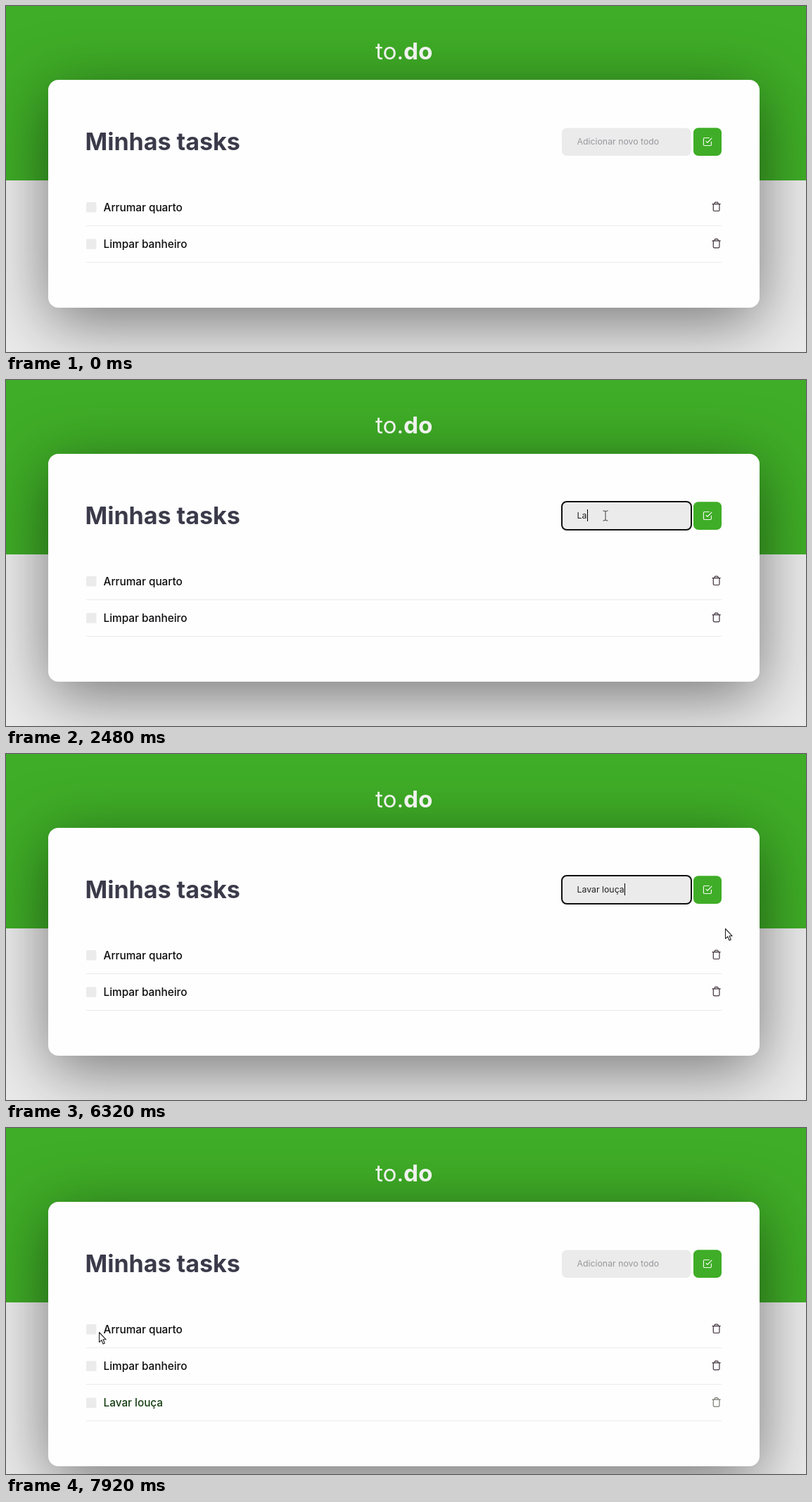
Animation, 1137 px wide and 492 px high, one loop 7990 ms. Source, as an HTML page:

```html
<!DOCTYPE html>
<html lang="pt-BR">
<head>
<meta charset="utf-8">
<title>to.do</title>
<style>
html, body { margin: 0; width: 100%; height: 100%; overflow: hidden; background: #ebebeb; }
svg { position: absolute; left: 0; top: 0; font-family: Inter, "Open Sans", sans-serif; }
#header { position: absolute; inset: 0 0 auto; height: 248.4px; background: #3fad27; }
#card {
  position: absolute; left: 59.5px; top: 104.5px; width: 1011.5px;
  border-radius: 14.5px; background: #fefefe; box-shadow: 0 20px 90px rgba(0, 0, 0, .5);
}
text { white-space: pre; }
.logo { font-size: 33.2px; font-weight: 400; fill: #f0f2ef; }
.logo tspan { font-weight: 700; }
.title { font-size: 34px; font-weight: 700; fill: #3a3a4a; }
.item { font-size: 15.3px; font-weight: 500; fill: #0c0c0e; }
.item.new { fill: #143d12; }
.field { font-size: 12.3px; fill: #222; }
.field.hint { fill: #98989d; }
.icon { fill: none; stroke-width: 1.9; stroke-linecap: round; stroke-linejoin: round; }
.pointer { fill: #fff; stroke: #222; stroke-width: 1.1; stroke-linejoin: round; }
</style>
</head>
<body>
<div id="header"></div>
<div id="card"></div>
<svg width="1137" height="492" viewBox="0 0 1137 492">
  <text class="logo" x="525" y="75.5">to.<tspan>do</tspan></text>
  <text class="title" x="112.5" y="205">Minhas tasks</text>

  <rect x="790" y="173.5" width="183.5" height="39.5" rx="7" fill="#ebebeb"/>
  <rect id="focus" x="790" y="173" width="184" height="40" rx="7" fill="none" stroke="#101010" stroke-width="2"/>
  <text id="field" class="field" x="811.5" y="197"></text>
  <path id="caret" d="M0 184V201" stroke="#000"/>

  <rect id="button" x="977" y="173.3" width="40" height="39.7" rx="7"/>
  <path class="icon" transform="translate(997.2 193) scale(.61) translate(-12.5 -12)" stroke="#f2f8f0"
    d="M9 11l3 3L22 4M21 12v7a2 2 0 0 1-2 2H5a2 2 0 0 1-2-2V5a2 2 0 0 1 2-2h11"/>

  <g id="items"></g>

  <circle id="click" r="11"/>
  <g id="cursor">
    <path id="arrow" class="pointer" d="M.5.5V14.6L3.7 11.7 6 17 8.3 16 6 10.8H10.2Z"/>
    <path id="beam" fill="none" stroke="#3a3a3a"
      d="M-3.5-7Q-.5-7 0-6Q.5-7 3.5-7M0-6V6M-3.5 7Q-.5 7 0 6Q.5 7 3.5 7"/>
    <path id="hand" class="pointer" d="M-1 1.7A1.7 1.7 0 0 1 2.4 1.7V7.2A1.5 1.5 0 0 1 5.4 7.5A1.5 1.5 0 0 1 8.3 8.2A1.5 1.5 0 0 1 11 9.5V13.5Q11 16 9.3 18V20.5H1V18.5Q-1 16-5 12.6A1.6 1.6 0 0 1-2.8 10.4L-1 12Z"/>
  </g>
</svg>
<script>
const LOOP = 7990;
const FOCUS = [1350, 6650];
const ADDED = 6780;
const HINT = 'Adicionar novo todo';
const TASK = 'Lavar louça';
const KEY_TIMES = [2080, 2480, 2880, 3020, 3100, 3300, 4100, 4370, 4640, 5180, 5240];
const BLINK = 530;

// Each move: first step, last step, number of steps, cubic Bezier points.
const MOVES = [
  [190, 950, 12, [[1052, 488], [1010, 400], [890, 225], [855, 195]]],
  [1080, 1080, 1, [[855, 195], [854, 194], [853, 193], [852, 193]]],
  [5900, 6520, 10, [[852, 193], [960, 260], [1072, 320], [998, 186]]],
  [7240, 7920, 11, [[998, 186], [800, 250], [420, 265], [132, 290]]]
];

const YELLOW = 'rgba(247, 238, 20, .6)';
const CLICKS = [
  [1080, 1350, 850, 192, YELLOW],
  [6590, 6780, 998, 186, YELLOW],
  [6780, 7240, 998, 186, 'rgba(48, 134, 30, .7)']
];

const $ = id => document.getElementById(id);
const show = (id, on) => { $(id).style.display = on ? '' : 'none'; };
const within = (t, [from, to]) => t >= from && t < to;
const inBox = ([x, y], left, right) => x >= left && x <= right && y >= 173 && y <= 213;

function itemMarkup(label, i) {
  const y = 286 + i * 52.3;
  const isNew = i === 2;
  return `<g id="item${i}">
    <rect x="114" y="${y - 7}" width="14.4" height="14.4" rx="1.5" fill="#ebebeb"/>
    <text class="item${isNew ? ' new' : ''}" x="138.6" y="${y + 5.7}">${label}</text>
    <path class="icon" transform="translate(1009.6 ${y - .7}) scale(.62) translate(-12 -12)" stroke="${isNew ? '#74776c' : '#3a2c36'}"
      d="M3 6H21M19 6V20a2 2 0 0 1-2 2H7a2 2 0 0 1-2-2V6M8 6V4a2 2 0 0 1 2-2h4a2 2 0 0 1 2 2V6"/>
    <path d="M114 ${Math.floor(y + 26) + .5}H1017" stroke="#ebebeb"/>
  </g>`;
}
$('items').innerHTML = ['Arrumar quarto', 'Limpar banheiro', TASK].map(itemMarkup).join('');

function bezier([a, b, c, d], p) {
  const q = 1 - p;
  return [0, 1].map(k =>
    q * q * q * a[k] + 3 * q * q * p * b[k] + 3 * q * p * p * c[k] + p * p * p * d[k]);
}

function cursorAt(t) {
  const move = MOVES.filter(m => t >= m[0]).pop();
  if (!move) return null;
  const [from, to, count, points] = move;
  const step = count > 1 ? Math.floor((t - from) / (to - from) * (count - 1) + 1e-6) : 0;
  const p = Math.min(1, (step + 1) / count);
  return bezier(points, p * p * (3 - 2 * p));
}

function drawField(t) {
  const focused = within(t, FOCUS);
  const typed = t < ADDED ? TASK.slice(0, KEY_TIMES.filter(k => t >= k).length) : '';
  const field = $('field');
  field.textContent = typed || HINT;
  field.classList.toggle('hint', !typed);
  const lastInput = [FOCUS[0], ...KEY_TIMES].filter(k => t >= k).pop();
  show('focus', focused);
  show('caret', focused && Math.floor((t - lastInput) / BLINK) % 2 === 0);
  const width = typed ? field.getComputedTextLength() : 0;
  $('caret').setAttribute('transform', `translate(${Math.round(812 + width) + .5} 0)`);
}

function drawCursor(t) {
  const pos = cursorAt(t);
  show('cursor', pos);
  const overField = pos && inBox(pos, 790, 973);
  const overButton = pos && inBox(pos, 977, 1017);
  show('beam', overField);
  show('hand', overButton);
  show('arrow', !overField && !overButton);
  $('button').setAttribute('fill', overButton ? '#3a9f24' : '#3fad27');
  if (pos) $('cursor').setAttribute('transform', `translate(${pos.map(Math.round)})`);

  const click = CLICKS.find(c => within(t, c));
  show('click', click);
  if (click) {
    const [, , x, y, color] = click;
    $('click').setAttribute('transform', `translate(${x} ${y})`);
    $('click').setAttribute('fill', color);
  }
}

function draw(now) {
  const t = now % LOOP;
  drawField(t);
  drawCursor(t);
  show('item2', t >= ADDED);
  $('card').style.height = (t >= ADDED ? 376.7 : 324.4) + 'px';
}

const start = performance.now();
function tick() {
  draw(performance.now() - start);
  requestAnimationFrame(tick);
}
tick();
</script>
</body>
</html>
```
